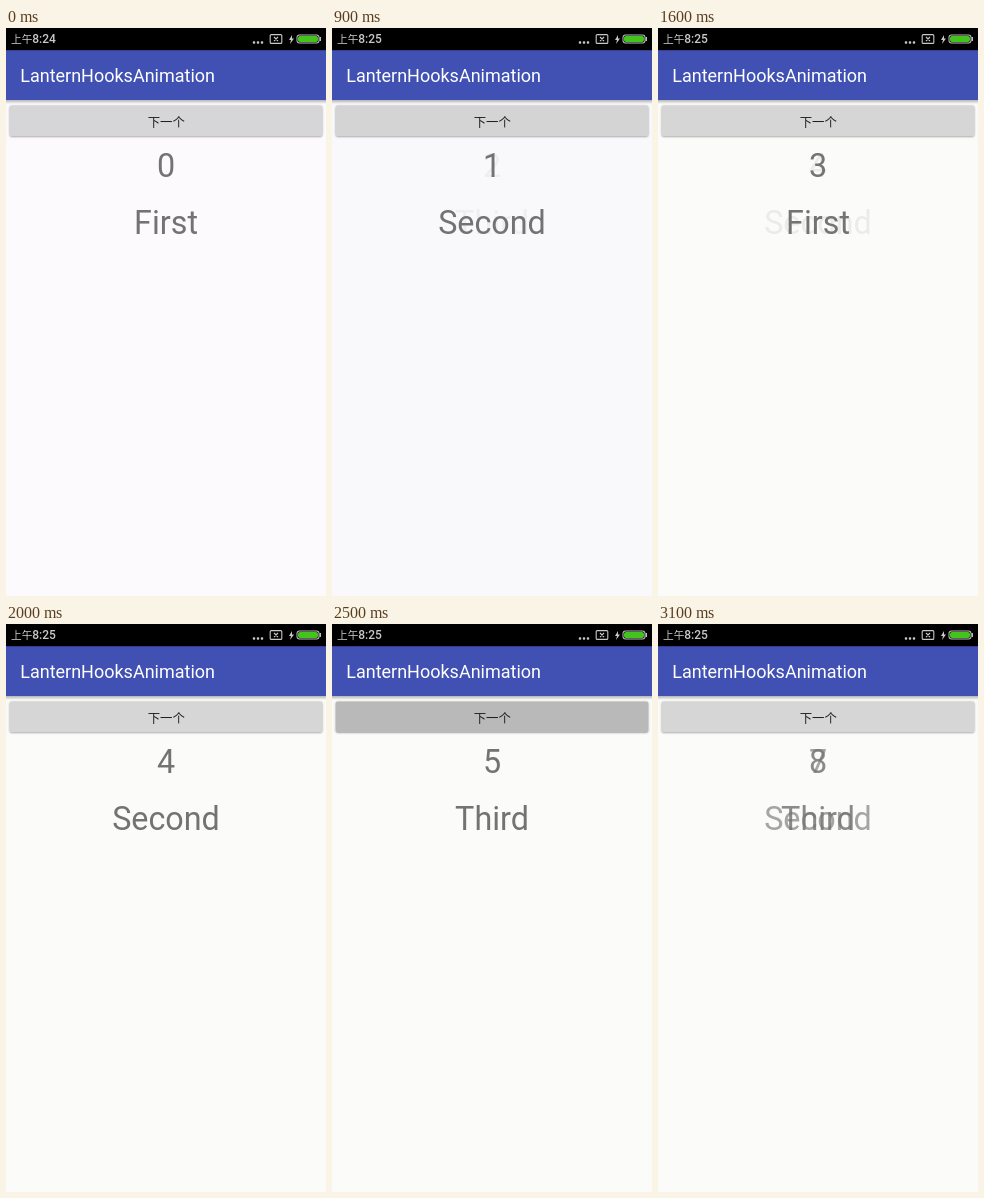
An HTML page with a canvas for the animation above (3.2 s loop, 320 by 568 pixels).

```html
<!DOCTYPE html>
<html lang="zh">
<head>
<meta charset="utf-8">
<style>
html, body { margin: 0; width: 100%; height: 100%; overflow: hidden; }
canvas { display: block; width: 320px; height: 568px; }
</style>
</head>
<body>
<canvas width="320" height="568"></canvas>
<script>
const ctx = document.querySelector('canvas').getContext('2d');
const LOOP = 3200, STEP = 100, FADE = 250;
const WORDS = ['First', 'Second', 'Third'];
const SWITCHES = [490, 890, 1230, 1585, 2200, 2600, 2810, 2950];
const PRESSES = [[100, 500], [800, 900], [1200, 1300], [1500, 1600],
                 [2100, 2200], [2500, 2600], [2700, 2800], [2900, 3000]];
// Start time, page colour, button colour
const TONES = [
  [0, '#fcfafd', '#d6d5d8'],
  [500, '#f8f9fa', '#d4d8d4'],
  [700, '#f9f8fb', '#d4d4d4'],
  [1100, '#fbfbfa', '#d6d6d6']
];
const LATIN = 'Roboto, sans-serif';
const HAN = '"Noto Sans CJK SC", "Noto Sans CJK", sans-serif';
const GREY = '#c8c8c8';

function rect(x, y, w, h, color) {
  ctx.fillStyle = color;
  ctx.fillRect(x, y, w, h);
}

function pill(x, y, w, h, r, color) {
  ctx.fillStyle = color;
  ctx.beginPath();
  ctx.roundRect(x, y, w, h, r);
  ctx.fill();
}

function text(str, x, y, font, color, align = 'left') {
  ctx.font = font;
  ctx.textAlign = align;
  ctx.fillStyle = color;
  ctx.fillText(str, x, y);
}

function drawStatusBar(clock) {
  rect(0, 0, 320, 22.2, '#000');
  text('上午', 5, 15, `500 10.7px ${HAN}`, GREY);
  text(clock, 26.3, 15, `500 12px ${LATIN}`, GREY);
  for (let i = 0; i < 3; i++) pill(246.8 + i * 4, 13.3, 2.4, 2.4, 0.8, GREY);

  ctx.strokeStyle = GREY;
  ctx.lineWidth = 1.1;
  ctx.beginPath();
  ctx.roundRect(264.2, 6.6, 11.6, 8.8, 1);
  ctx.moveTo(268, 9);
  ctx.lineTo(272, 13);
  ctx.moveTo(272, 9);
  ctx.lineTo(268, 13);
  ctx.stroke();

  ctx.fillStyle = GREY;
  ctx.fill(new Path2D('M286 7L283 12H285L284 16L288 10.5H286Z'));

  pill(290.5, 6.5, 23, 9, 3, '#bdbdbd');
  pill(291.5, 7.5, 21, 7, 2, '#000');
  pill(292, 8, 20, 6, 2, '#43c41c');
  rect(313.5, 9, 1.5, 4, '#bdbdbd');
}

function drawToolbar() {
  rect(0, 22, 320, 50, '#4051b3');
  const shadow = ctx.createLinearGradient(0, 72, 0, 76);
  shadow.addColorStop(0, 'rgba(0,0,0,.28)');
  shadow.addColorStop(1, 'rgba(0,0,0,0)');
  rect(0, 72, 320, 4, shadow);
  text('LanternHooksAnimation', 14.2, 54, `18px ${LATIN}`, '#fff');
}

function drawButton(color) {
  ctx.save();
  ctx.shadowColor = 'rgba(0,0,0,.35)';
  ctx.shadowBlur = 2;
  ctx.shadowOffsetY = 0.7;
  pill(3.7, 77.4, 312.6, 30.8, 1.8, color);
  ctx.restore();
  text('下一个', 160.3, 98.5, `12.4px ${HAN}`, '#202020', 'center');
}

function drawEntry(index, alpha) {
  const font = `32.3px ${LATIN}`;
  ctx.globalAlpha = alpha;
  text(index, 160, 148.7, font, '#737374', 'center');
  text(WORDS[index % WORDS.length], 160, 205.6, font, '#737374', 'center');
  ctx.globalAlpha = 1;
}

function draw(t) {
  const [, page, button] = TONES.findLast(([start]) => t >= start);
  const pressed = PRESSES.some(([down, up]) => t >= down && t < up);
  rect(0, 0, 320, 568, page);
  drawToolbar();
  drawStatusBar(t < 600 ? '8:24' : '8:25');
  drawButton(pressed ? '#b9b9b9' : button);

  // The old entry accelerates out while the new one decelerates in
  const count = SWITCHES.filter(start => t >= start).length;
  const p = count ? Math.min(1, (t - SWITCHES[count - 1]) / FADE) : 1;
  if (p < 1) drawEntry(count - 1, 1 - p * p);
  drawEntry(count, 1 - (1 - p) ** 2);
}

const origin = performance.now();
function tick() {
  const t = (performance.now() - origin) % LOOP;
  draw(Math.floor(t / STEP) * STEP);
  requestAnimationFrame(tick);
}
tick();
</script>
</body>
</html>
```
